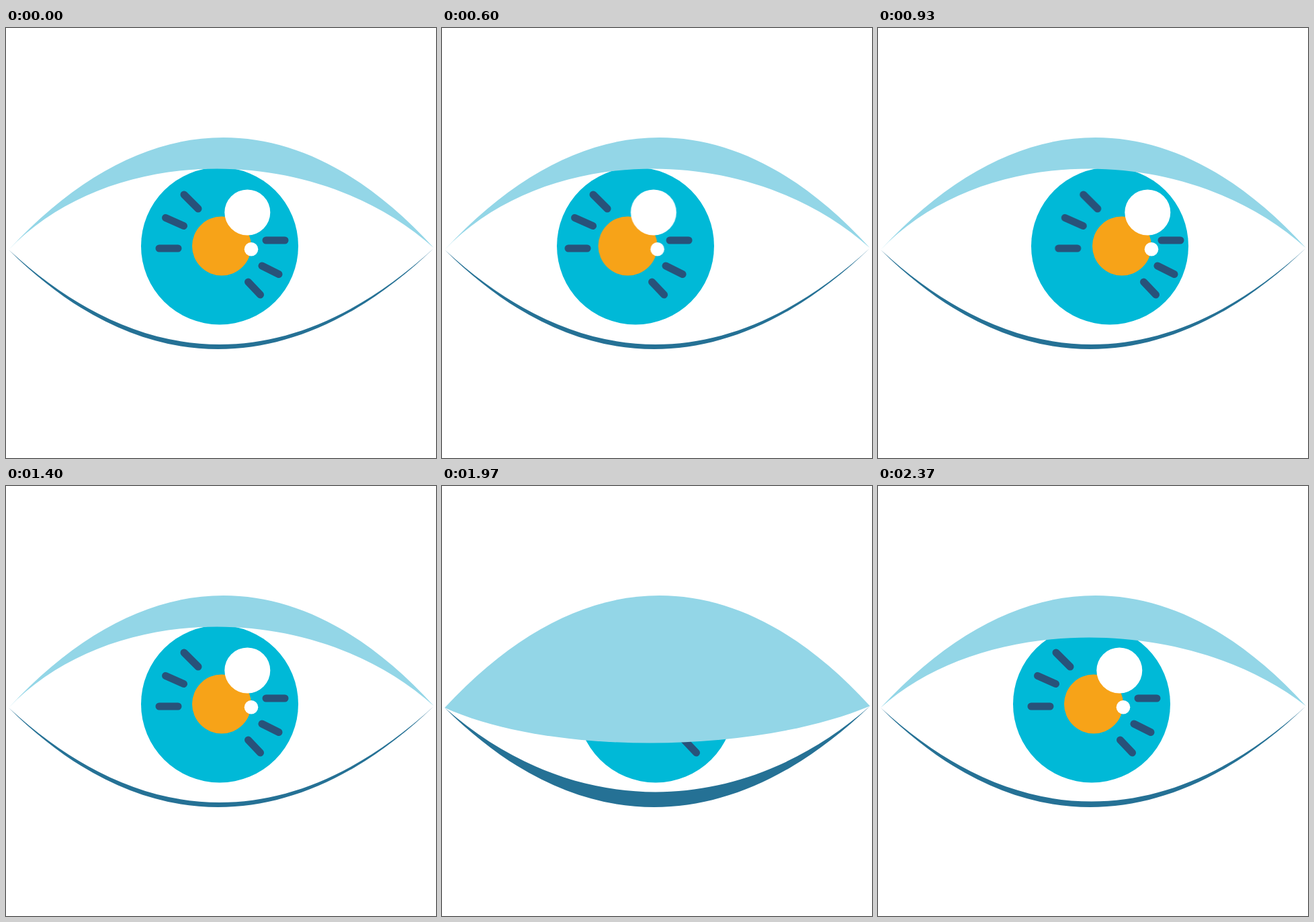
An HTML page for the animation above (2410 ms loop, 640x640 px).

```html
<!DOCTYPE html>
<html lang="en">
<head>
<meta charset="utf-8">
<title>Looking eye</title>
<style>
  html, body { margin: 0; width: 100%; height: 100%; overflow: hidden; background: #fff; }
  svg { display: block; width: 100vw; height: 100vh; }
  .mark { fill: none; stroke: #28527a; stroke-width: 11; stroke-linecap: round; }
</style>
</head>
<body>
<svg viewBox="0 0 640 640">
  <circle id="iris" cx="318" cy="324.5" r="117" fill="#00b9d7"/>
  <path id="leftMarks" class="mark" d="M228 328H256M237.5 282.5L264.5 294.5M265 248L286 269"/>
  <path id="rightMarks" class="mark" d="M387 316H415M381 354L406 366.5M360.5 378L378.5 397"/>
  <g id="pupil">
    <circle cx="321" cy="324.5" r="44" fill="#f7a318"/>
    <circle cx="359.3" cy="274.5" r="34" fill="#fff"/>
    <circle cx="365" cy="329.2" r="10.3" fill="#fff"/>
  </g>
  <path id="upperLid" fill="#93d6e7"/>
  <path id="lowerLid" fill="#257195"/>
</svg>
<script>
  const LOOP = 2410;
  const FRAMES = 60;

  // Cubic timing curve with handles (a, 0) and (1 - a, 1).
  function ease(u, a) {
    let lo = 0, hi = 1;
    for (let i = 0; i < 30; i++) {
      const s = (lo + hi) / 2;
      const x = 3 * a * s * (1 - s) ** 2 + 3 * (1 - a) * s * s * (1 - s) + s ** 3;
      if (x < u) lo = s; else hi = s;
    }
    return lo * lo * (3 - 2 * lo);
  }

  // Keys: [frame, value, handle of the curve leading to it].
  function track(keys, frame) {
    for (let i = 1; i < keys.length; i++) {
      const [f0, v0] = keys[i - 1];
      const [f1, v1, a] = keys[i];
      if (frame <= f1) return v0 + (v1 - v0) * ease((frame - f0) / (f1 - f0), a);
    }
    return keys[keys.length - 1][1];
  }

  const gaze = (left, right) => [
    [0, 0], [6, left, 1 / 3], [12, left, 1 / 3], [23, right, 1 / 3],
    [30, right, 1 / 3], [35, 0, 1 / 3]
  ];
  const blink = [[0, 0], [45, 0, 1 / 3], [51, 1, 0.215], [60, 0, 1 / 6]];

  // 25 fps poses shown on a 30 fps clock with 10 ms resolution.
  function startOf(frame) {
    if (!frame) return 0;
    const tick = Math.floor((frame - 0.5) * 6 / 5) + 1;
    return Math.round(tick * 10 / 3) * 10;
  }

  function play(id, pose) {
    const steps = Array.from({ length: FRAMES }, (_, f) => ({
      ...pose(f), offset: startOf(f) / LOOP, easing: 'steps(1, end)'
    }));
    steps.push({ ...pose(FRAMES - 1), offset: 1 });
    document.getElementById(id).animate(steps, { duration: LOOP, iterations: Infinity });
  }

  // Arc controls: left x, right x, and the y its middle should reach.
  const ctrl = y => (y - 82.2) / 0.75;

  function lid([x1, x2, outer], [x3, x4, inner]) {
    const o = ctrl(outer), i = ctrl(inner);
    return { d: `path("M4 330C${x1} ${o} ${x2} ${o} 637 327.5C${x4} ${i} ${x3} ${i} 4 330Z")` };
  }

  const slide = (left, right) => {
    const keys = gaze(left, right);
    return f => ({ transform: `translateX(${track(keys, f)}px)` });
  };

  play('iris', slide(-42.8, 27));
  play('leftMarks', slide(-58, 40.7));
  play('rightMarks', slide(-66.5, 35));
  play('pupil', slide(-63.8, 42));
  play('upperLid', f => lid([210, 437, 163], [158, 462, 209.5 + 244 * track(blink, f)]));
  play('lowerLid', f => {
    const shut = track(blink, f);
    return lid([202, 429, 478], [208 - 20 * shut, 429 + 20 * shut, 471 - 22 * shut]);
  });
</script>
</body>
</html>
```
